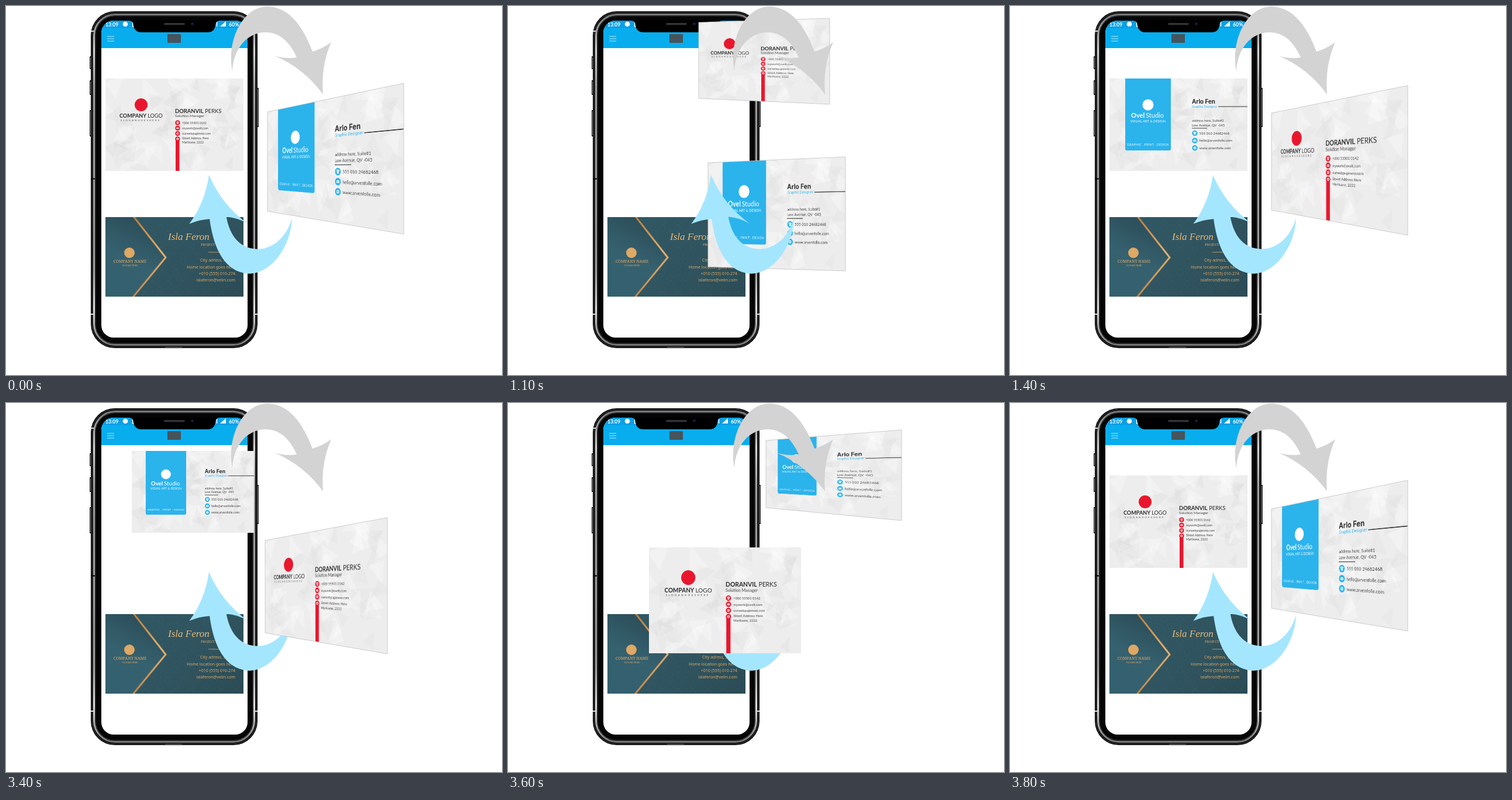
These frames come from a looping animation (848 px wide and 631 px high, 4800 ms). An HTML page with a canvas:

```html
<!DOCTYPE html>
<html lang="en">
<head>
<meta charset="utf-8">
<title>Card exchange</title>
<style>
  html, body { margin: 0; width: 100%; height: 100%; overflow: hidden; background: #fff; }
  canvas { display: block; }
</style>
</head>
<body>
<canvas id="stage" width="848" height="631"></canvas>
<script>
const LOOP = 4800, STEP = 100, STARTS = [1000, 3400], LAST = 5;
const CARD_W = 236, CARD_H = 158, SPRITE_SCALE = 2;
const RED = '#e9172d', BLUE = '#2bb3ec', GOLD = '#dfa865', INK = '#2b2b2b';
const LATO = 'Lato, sans-serif', INTER = 'Inter, sans-serif', SERIF = '"Noto Serif", serif';
const ctx = document.getElementById('stage').getContext('2d');

function text(c, str, x, y, font, color, align = 'left', spacing = 0) {
  c.font = font;
  c.fillStyle = color;
  c.textAlign = align;
  c.letterSpacing = spacing + 'px';
  c.fillText(str, x, y);
  return c.measureText(str).width;
}

function boldLight(c, bold, light, x, y, size, color, gap = 2.5) {
  const w = text(c, bold, x, y, `700 ${size}px ${LATO}`, color);
  text(c, light, x + w + gap, y, `400 ${size}px ${LATO}`, color);
}

function box(c, x, y, w, h, r, fill) {
  c.beginPath();
  c.roundRect(x, y, w, h, r);
  c.fillStyle = fill;
  c.fill();
}

function disc(c, x, y, r, fill) {
  c.beginPath();
  c.arc(x, y, r, 0, Math.PI * 2);
  c.fillStyle = fill;
  c.fill();
}

function polygon(c, points, fill) {
  c.beginPath();
  points.forEach(([x, y]) => c.lineTo(x, y));
  c.fillStyle = fill;
  c.fill();
}

function line(c, points, color, width = 1) {
  c.beginPath();
  points.forEach(([x, y]) => c.lineTo(x, y));
  c.strokeStyle = color;
  c.lineWidth = width;
  c.stroke();
}

function gradient(c, x0, y0, x1, y1, ...colors) {
  const g = c.createLinearGradient(x0, y0, x1, y1);
  colors.forEach((color, i) => g.addColorStop(i / (colors.length - 1), color));
  return g;
}

function seeded(seed) {
  return () => (seed = (seed * 16807) % 2147483647) / 2147483647;
}

// Pale paper with faint triangular facets
function paper(c) {
  const rnd = seeded(71);
  c.fillStyle = '#ededed';
  c.fillRect(0, 0, CARD_W, CARD_H);
  for (let i = 0; i < 75; i++) {
    const x = rnd() * CARD_W, y = rnd() * CARD_H, turn = rnd() * 6.28;
    const corners = [0, 1, 2].map(k => {
      const a = turn + k * 2.1 + rnd() * 0.7, r = 9 + rnd() * 16;
      return [x + r * Math.cos(a), y + r * Math.sin(a)];
    });
    polygon(c, corners, i % 2 ? 'rgba(212,212,212,.2)' : 'rgba(255,255,255,.25)');
  }
}

function contactIcon(c, kind, x, y, r, color) {
  disc(c, x, y, r, color);
  const s = r * 0.5;
  if (kind === 'mail') {
    box(c, x - s, y - s * 0.7, s * 2, s * 1.4, 0.3, '#fff');
    line(c, [[x - s, y - s * 0.6], [x, y + s * 0.2], [x + s, y - s * 0.6]], color, 0.5);
  } else if (kind === 'phone') {
    box(c, x - s, y - s, s * 2, s * 0.8, 0.5, '#fff');
    box(c, x - s * 0.7, y, s * 1.4, s, 0.3, '#fff');
  } else {
    disc(c, x, y, s, '#fff');
    if (kind === 'web') {
      line(c, [[x - s, y], [x + s, y]], color, 0.5);
      line(c, [[x, y - s], [x, y + s]], color, 0.5);
    } else disc(c, x, y, s * 0.45, color);
  }
}

function redCard(c) {
  paper(c);
  disc(c, 61, 45, 11, RED);
  boldLight(c, 'COMPANY', 'LOGO', 24, 67, 9.1, INK, 2);
  text(c, 'SLOGANGOESHERE', 26, 72.5, `400 4px ${LATO}`, '#444', 'left', 2.25);
  boldLight(c, 'DORANVIL', 'PERKS', 119, 58.5, 9.4, INK);
  text(c, 'Solution Manager', 119, 66, `400 6.4px ${LATO}`, '#444');
  c.fillStyle = RED;
  c.fillRect(120, 105, 6.5, CARD_H - 105);
  const rows = [['phone', '+000 55501 0142'], ['mail', 'mywork@ovelt.com'],
    ['web', 'ourwebpagenow.com'], ['pin', 'Street Address Here']];
  rows.forEach(([kind, label], i) => {
    const y = 75.7 + i * 9.2;
    contactIcon(c, kind, 123.4, y, 4.1, RED);
    text(c, label, 131, y + (i < 3 ? 2 : 0.9), `400 5.2px ${LATO}`, '#444');
  });
  text(c, 'Marlivane, 2222', 131, 111, `400 5.2px ${LATO}`, '#444');
}

function blueCard(c) {
  paper(c);
  box(c, 27, 0, 78, 123, [0, 0, 3, 3], BLUE);
  disc(c, 66, 45, 9.5, '#fff');
  boldLight(c, 'Ovel', 'Studio', 37, 67, 11, '#fff', 2);
  text(c, 'VISUAL ART & DESIGN', 66, 75, `400 5.8px ${LATO}`, '#fff', 'center');
  text(c, 'GRAPHIC . PRINT . DESIGN', 66, 115, `400 5.1px ${LATO}`, '#fff', 'center', 0.35);
  text(c, 'Arlo Fen', 141, 43, `700 9.8px ${INTER}`, INK);
  text(c, 'Graphic Designer', 141, 49.7, `400 5.3px ${INTER}`, BLUE);
  line(c, [[186, 48], [CARD_W, 48]], '#333');
  text(c, 'address here, Suite#1', 141, 74, `400 5.8px ${LATO}`, '#444');
  text(c, 'Low Avenue, QV -045', 141, 81.5, `400 5.8px ${LATO}`, '#444');
  line(c, [[141, 85], [167, 85]], '#444');
  const rows = [['phone', '555 010 24682468'], ['mail', 'hello@arvenfolle.com'], ['web', 'www.arvenfolle.com']];
  rows.forEach(([kind, label], i) => {
    const y = 93.5 + i * 12.6;
    contactIcon(c, kind, 146, y, 4.7, BLUE);
    text(c, label, 153.5, y + 2.2, `400 6px ${LATO}`, '#444');
  });
}

function sprite(draw) {
  const canvas = document.createElement('canvas');
  canvas.width = CARD_W * SPRITE_SCALE;
  canvas.height = CARD_H * SPRITE_SCALE;
  const c = canvas.getContext('2d');
  c.scale(SPRITE_SCALE, SPRITE_SCALE);
  draw(c);
  return { draw, canvas };
}

// A pose is: left x, its top and height, right x, its top and height.
// Tilted cards are drawn in one-pixel columns with perspective-correct sampling.
function drawCard({ draw, canvas }, [x0, y0, h0, x1, y1, h1]) {
  const w = x1 - x0;
  if (h0 === h1) {
    ctx.save();
    ctx.translate(x0, y0);
    ctx.scale(w / CARD_W, h0 / CARD_H);
    ctx.beginPath();
    ctx.rect(0, 0, CARD_W, CARD_H);
    ctx.clip();
    draw(ctx);
    ctx.restore();
    return;
  }
  const unproject = s => canvas.width * s / (s + (1 - s) * h0 / h1);
  for (let i = 0; i < w; i++) {
    const a = unproject(i / w), b = unproject((i + 1) / w), mid = (i + 0.5) / w;
    ctx.drawImage(canvas, a, 0, b - a, canvas.height,
      x0 + i, y0 + (y1 - y0) * mid, 1, h0 + (h1 - h0) * mid);
  }
  line(ctx, [[x0, y0], [x1, y1], [x1, y1 + h1], [x0, y0 + h0], [x0, y0]], '#c2c2c2', 0.8);
}

function greenCard(c) {
  c.save();
  c.translate(170, 361);
  c.beginPath();
  c.rect(0, 0, 236, 136);
  c.clip();
  c.fillStyle = gradient(c, 60, 0, 236, 136, '#305763', '#30545f', '#2b4b55');
  c.fillRect(0, 0, 236, 136);
  for (let i = 0; i < 120; i++) {
    c.beginPath();
    c.arc(55 + (i % 15) * 13, Math.floor(i / 15) * 19 + (i % 2) * 9, 5, 0, 6.28);
    c.strokeStyle = 'rgba(110,160,170,.06)';
    c.lineWidth = 1;
    c.stroke();
  }
  polygon(c, [[0, 0], [48, 0], [103, 69], [48, 136], [0, 136]],
    gradient(c, 0, 136, 70, 0, '#33606f', '#36616f', '#2a4b56'));
  line(c, [[48, -1], [103, 69], [47, 137]], gradient(c, 48, 0, 75, 136, '#b67d3f', '#e4b06f', '#bb8347'), 3);
  disc(c, 41, 61, 9, GOLD);
  text(c, 'COMPANY NAME', 42, 78, `400 6.9px ${SERIF}`, GOLD, 'center');
  text(c, 'SLOGAN HERE', 42, 83.5, `400 3.8px ${SERIF}`, GOLD, 'center');
  text(c, 'Isla Feron', 107, 39, 'italic 400 17px "Liberation Serif", serif', '#e9b878');
  text(c, 'PROJECT MANAGER', 163, 49, `400 5.8px ${SERIF}`, GOLD);
  line(c, [[176, 60], [222, 60]], GOLD, 0.8);
  const font = '500 7px "Noto Sans", sans-serif';
  text(c, 'City adress, State', 162, 76, font, GOLD);
  text(c, 'Home location goes here', 139, 88, font, GOLD);
  text(c, '+010 (555) 010-274', 222, 99, font, GOLD, 'right');
  text(c, 'islaferon@velin.com', 222, 110, font, GOLD, 'right');
  c.restore();
}

function ring(c, inset, radius, width, color) {
  c.beginPath();
  c.roundRect(145 + inset, 9 + inset, 285 - inset * 2, 576 - inset * 2, radius);
  c.strokeStyle = color;
  c.lineWidth = width;
  c.stroke();
}

function phone(c) {
  [[143, 86, 22], [143, 127, 25], [143, 178, 45], [429, 140, 67]].forEach(([x, y, h]) => {
    box(c, x, y, 3, h, 1, '#111');
    box(c, x + 1, y + 2, 1, h - 4, 0, '#999');
  });
  box(c, 145, 9, 285, 576, 41, '#050505');
  ring(c, 2, 39, 1, '#4a4a4a');
  const steel = gradient(c, 0, 14, 0, 580,
    '#777', '#d8d8d8', '#a4a4a4', '#9a9a9a', '#a0a0a0', '#a0a0a0', '#9a9a9a', '#a4a4a4', '#e2e2e2', '#777');
  ring(c, 5.5, 36, 3, steel);
  ring(c, 8, 33, 1, '#444');
  for (const x of [145, 425]) for (const y of [43, 527]) line(c, [[x, y], [x + 5, y]], '#ddd', 2);
  line(c, [[145, 295.5], [152, 295.5]], '#000', 2);
  line(c, [[272, 583.5], [301, 583.5]], '#777');

  c.save();
  c.beginPath();
  c.roundRect(163, 25, 250, 542, 21);
  c.clip();
  c.fillStyle = '#fff';
  c.fillRect(163, 25, 250, 542);
  c.fillStyle = '#08adee';
  c.fillRect(163, 25, 250, 47);
  c.fillStyle = '#0ba0e5';
  c.fillRect(163, 25, 250, 13);
  text(c, '13:09', 170, 34.5, `700 8.6px ${LATO}`, '#fff');
  disc(c, 204, 31, 4.3, '#fff');
  line(c, [[220, 27], [216.5, 27], [216.5, 35], [220, 35]], '#fff', 1.3);
  line(c, [[360.5, 27], [360.5, 35]], '#fff', 1.5);
  polygon(c, [[366, 35], [376, 35], [376, 26]], '#fff');
  text(c, '60%', 381, 34.5, `700 8.8px ${LATO}`, '#fff');
  [52, 56, 60].forEach(y => line(c, [[173, y], [185, y]], '#b9e7fb', 1.2));
  box(c, 276, 48, 23, 15, 1, '#46545c');
  c.beginPath();
  c.moveTo(210, 25);
  c.quadraticCurveTo(217, 25, 218, 32);
  c.quadraticCurveTo(219, 45, 232, 45);
  c.lineTo(344, 45);
  c.quadraticCurveTo(357, 45, 358, 32);
  c.quadraticCurveTo(359, 25, 366, 25);
  c.fillStyle = '#000';
  c.fill();
  c.restore();
  box(c, 270, 29, 36, 3.5, 2, '#333');
  disc(c, 318.5, 30.5, 2.2, '#17204f');
}

// Curved arrow with its tip at (542, 151)
const ARROW = new Path2D(`M387 111 C377 58 405 1 447 1 C485 1 509 38 524 78
  Q541 73 556 62 Q538 103 542 151 Q509 106 459 85 Q478 91 497 88
  C484 58 465 45 444 45 C412 45 389 73 387 111 Z`);

function arrow(tipX, tipY, degrees, color) {
  ctx.save();
  ctx.translate(tipX, tipY);
  ctx.rotate(degrees * Math.PI / 180);
  ctx.translate(-542, -151);
  ctx.fillStyle = color;
  ctx.fill(ARROW);
  ctx.restore();
}

const HOME = [170, 124, 158, 406, 124, 158];
const outgoing = away => [HOME, [215, 82, 140, 424, 82, 140], [326, 28, 130, 550, 21, 147],
  [441, 64, 115, 673, 46, 155], [494, 118, 142, 727, 84, 206], away];
const incoming = (away, dip) => [away, [443, 235, 158, 652, 196, 233], [342, 268 + dip, 178, 577, 258 + dip, 195],
  [241, 247, 181, 501, 247, 181], [205, 186, 170, 453, 186, 170], HOME];

const RED_AWAY = [447, 183, 166, 680, 136, 256], BLUE_AWAY = [447, 181, 170, 680, 132, 258];
const red = sprite(redCard), blue = sprite(blueCard);
const SWAPS = [
  { out: red, into: blue, outPoses: outgoing(RED_AWAY), inPoses: incoming(BLUE_AWAY, 0) },
  { out: blue, into: red, outPoses: outgoing(BLUE_AWAY), inPoses: incoming(RED_AWAY, 43) }
];

function render(swapIndex, step) {
  const { out, into, outPoses, inPoses } = SWAPS[swapIndex];
  const outOnTop = swapIndex === 0 && (step === 3 || step === 4);
  const inOnTop = swapIndex === 1 && step > 0 && step < LAST;
  const drawOut = () => drawCard(out, outPoses[step]);
  const drawIn = () => drawCard(into, inPoses[step]);
  ctx.fillStyle = '#fff';
  ctx.fillRect(0, 0, 848, 631);
  phone(ctx);
  greenCard(ctx);
  if (!outOnTop) drawOut();
  if (!inOnTop) drawIn();
  arrow(542, 151, 0, '#d3d3d3');
  arrow(347, 289, 193, '#a5e6ff');
  if (outOnTop) drawOut();
  if (inOnTop) drawIn();
}

let shown = '';
function frame() {
  const t = performance.now() % LOOP;
  const swapIndex = t < STARTS[1] ? 0 : 1;
  const step = Math.max(0, Math.min(LAST, Math.floor((t - STARTS[swapIndex]) / STEP) + 1));
  const key = swapIndex + ':' + step;
  if (key !== shown) {
    render(swapIndex, step);
    shown = key;
  }
  requestAnimationFrame(frame);
}
ctx.imageSmoothingQuality = 'high';
frame();
</script>
</body>
</html>
```
